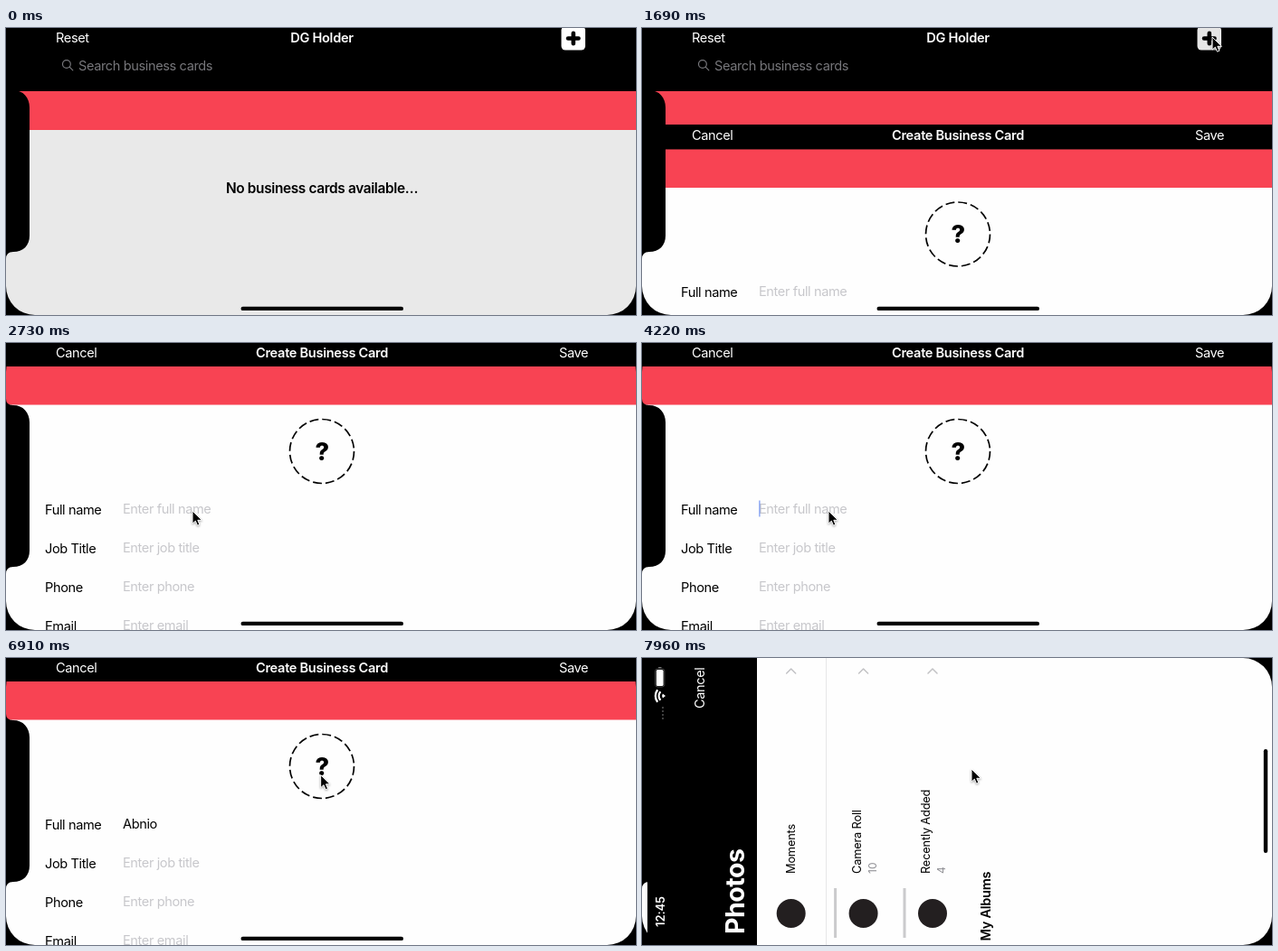
These frames come from a looping animation (696x318 px, 8000 ms). An HTML page:

```html
<!DOCTYPE html>
<html lang="en">
<head>
<meta charset="utf-8">
<title>Card holder</title>
<style>
  html, body { margin: 0; width: 100%; height: 100%; overflow: hidden; background: #000; }
  svg { display: block; width: 696px; height: 318px; }
  text { font: 400 14.6px Inter, Roboto, sans-serif; letter-spacing: -.4px; white-space: pre; }
  .semi { font-weight: 600; letter-spacing: -.3px; }
  .notice { font-size: 15.4px; font-weight: 600; letter-spacing: -.36px; }
  .large { font-size: 28.6px; font-weight: 700; letter-spacing: -.5px; }
  .hint { fill: #c7c7cb; }
  .row { font-size: 12.8px; letter-spacing: -.18px; }
  .count { font-size: 12px; letter-spacing: 0; fill: #8e8e93; }
  .clock { font-size: 13px; font-weight: 600; letter-spacing: -.1px; }
  .white { fill: #fff; }
  .banner { fill: #f84353; }
  .line { fill: none; stroke-linecap: round; stroke-linejoin: round; }
  .flat { fill: none; stroke-linecap: butt; }
</style>
</head>
<body>
<svg viewBox="0 0 696 318">
  <g id="home">
    <rect width="696" height="70"/>
    <rect class="banner" y="70" width="696" height="43"/>
    <rect y="113" width="696" height="205" fill="#e9e9e9"/>
    <text class="white" x="55" y="16">Reset</text>
    <text class="white semi" x="349" y="16" text-anchor="middle">DG Holder</text>
    <g id="add">
      <rect x="613.5" y="-2" width="26.5" height="26.5" rx="4.5" fill="#fff"/>
      <path class="line" stroke="#000" stroke-width="4.6" d="M621 11.5h11.5M626.8 5.7v11.6"/>
    </g>
    <path class="line" stroke="#77777b" stroke-width="1.2" d="M62.5 40a4.4 4.4 0 1 0 8.8 0a4.4 4.4 0 1 0-8.8 0M70.2 43.2l3.6 3.6"/>
    <text x="80" y="46.5" fill="#77777b">Search business cards</text>
    <text class="notice" x="349" y="183" text-anchor="middle">No business cards available…</text>
  </g>

  <g id="sheet">
    <g id="compactBar">
      <rect y="-1.5" width="696" height="28"/>
      <text class="white" x="55" y="16">Cancel</text>
      <text class="white semi" x="349" y="16" text-anchor="middle">Create Business Card</text>
      <text class="white" x="611" y="16">Save</text>
    </g>
    <g id="largeBar">
      <rect width="696" height="120"/>
      <text class="white" x="17" y="60">Cancel</text>
      <text class="white large" x="309" y="104.5" text-anchor="end">Create Business Card</text>
    </g>
    <g id="form">
      <rect class="banner" y="26" width="696" height="43"/>
      <rect y="68.5" width="696" height="330" fill="#fefefe"/>
      <g id="avatar">
        <circle class="flat" cx="349" cy="120" r="35.5" stroke="#000" stroke-width="1.7" stroke-dasharray="9.9 4.04"/>
        <text x="349" y="129.5" text-anchor="middle" style="font-size:27px;font-weight:800">?</text>
      </g>
      <g id="fields"></g>
      <text id="typed" x="129" y="189"></text>
      <rect id="caret" y="174.5" width="1.7" height="18" fill="#3c6df0"/>
    </g>
  </g>

  <g id="picker">
    <rect x="127" width="700" height="318" fill="#fefefe"/>
    <rect x="6" width="121" height="318"/>
    <path d="M203.5 0V318" stroke="#e6e6e8"/>
    <g id="albums"></g>
  </g>

  <path d="M0 62Q0 69 8 69C19 69 26 77 26 88V230C26 241 19 248 8 248Q0 248 0 256Z"/>
  <g id="corners"></g>
  <rect id="homeBar" x="259.5" y="308.7" width="179.5" height="4.4" rx="2.2"/>
  <rect id="sideBar" x="686.8" y="101" width="4.4" height="115" rx="2.2"/>

  <g id="status">
    <rect x="14.6" y="12" width="10.2" height="20" rx="2.6" fill="none" stroke="#555" stroke-width=".8"/>
    <rect class="white" x="15.8" y="13" width="7.8" height="18" rx="1.6"/>
    <rect x="18" y="10" width="3.6" height="1.3" rx=".6" fill="#777"/>
    <path class="flat" stroke="#fff" stroke-width="2.3" d="M17.2 35.2A11 11 0 0 0 17.2 48.8M20.4 37.3A7.3 7.3 0 0 0 20.4 46.7"/>
    <path class="white" d="M26 42L22.9 39.4Q21.2 42 22.9 44.6Z"/>
    <path class="line" stroke="#555" stroke-width="2" stroke-dasharray="0 4" d="M23 55V68"/>
    <g id="clock"></g>
  </g>

  <path id="cursor" d="M0 0V14.2L3.3 11.2L5.5 16.2L7.9 15.2L5.8 10.3H10.4Z" stroke="#fff" stroke-linejoin="round" style="filter:drop-shadow(0 1px 1px rgba(0,0,0,.35))"/>
</svg>
<script>
const $ = id => document.getElementById(id);
const move = (id, x, y) => $(id).setAttribute('transform', `translate(${x} ${y})`);
const show = (id, on) => { $(id).style.display = on ? '' : 'none'; };
const sideText = (x, y, cls, label) =>
  `<text class="${cls}" transform="translate(${x} ${y}) rotate(-90)">${label}</text>`;

$('fields').innerHTML = ['Full name', 'Job Title', 'Phone', 'Email'].map((label, i) => `
  <text x="43" y="${190 + 43 * i}">${label}</text>
  <text class="hint" ${i ? '' : 'id="nameHint"'} x="129" y="${189 + 43 * i}">Enter ${label.toLowerCase()}</text>`).join('');

const album = (x, label, count) => `
  <path class="line" stroke="#c2c2c5" stroke-width="1.5" d="M${x - 5} 17l5-5l5 5"/>
  <circle cx="${x}" cy="283" r="16" fill="#231f20"/>
  ${sideText(count ? x - 3 : x + 4, 239, 'row', label)}
  ${count ? sideText(x + 14, 239, 'count', count) +
    `<rect x="${x - 32.5}" y="255" width="3" height="55" fill="#cbcbcd"/>` : ''}`;

$('albums').innerHTML =
  sideText(68.7, 56, 'white', 'Cancel') +
  sideText(113.5, 306, 'white large', 'Photos') +
  sideText(385.5, 313.5, 'semi', 'My Albums') +
  album(164.7, 'Moments') + album(244.6, 'Camera Roll', 10) + album(321, 'Recently Added', 4);
$('clock').innerHTML = sideText(24.6, 298, 'white clock', '12:45');

for (const [x, sx] of [[0, 1], [696, -1]])
  for (const [y, sy] of [[0, 1], [318, -1]])
    $('corners').innerHTML +=
      `<path d="M0 0H32A32 32 0 0 0 0 32Z" transform="translate(${x} ${y}) scale(${sx} ${sy})"/>`;

// The picture advances in even beats after a short lead-in.
const LOOP = 8000, LEAD = 490, BEAT = 149.2;
const PRESS_ADD = 7, FOCUS = 21, BLUR = 42, PRESS_AVATAR = 47;
const NAME = 'Abnio', KEYS = [32, 33, 35, 36, 37];
const POINTER_START = [676, 82];
const LEGS = [
  { from: 0, to: 4, x: 630, y: 10 },
  { from: 10, to: 15, x: 206, y: 186 },
  { from: 40, to: 44, x: 364, y: 123 }
];

// Critically damped slide from 1 to 0.
const slide = (beat, start) => {
  const s = Math.max(0, beat - start) * 2.82;
  return (1 + s) * Math.exp(-s);
};

const ease = u => {
  u = Math.min(1, Math.max(0, u));
  return u * u * u * (u * (6 * u - 15) + 10);
};

const pointerAt = beat => LEGS.reduce(([px, py], { from, to, x, y }) => {
  const e = ease((beat - from) / (to - from));
  return [px + (x - px) * e, py + (y - py) * e];
}, POINTER_START);

// Solid for four beats, then fades out and back over the next four.
function caretLevel(beat, lastKey) {
  if (beat < FOCUS || beat >= BLUR) return 0;
  const phase = (beat - lastKey) % 8;
  return phase < 4 ? 1 : phase === 4 || phase === 7 ? .5 : 0;
}

function draw(now) {
  const beat = Math.floor((now % LOOP - LEAD) / BEAT);
  const portrait = beat > PRESS_AVATAR;

  $('add').style.opacity = beat >= PRESS_ADD ? .9 : 1;
  $('avatar').style.opacity = beat === PRESS_AVATAR ? .8 : 1;
  show('sheet', beat > PRESS_ADD);
  move('sheet', 0, 318 * slide(beat, 7.2));
  show('compactBar', !portrait);
  show('largeBar', portrait);
  move('form', 0, portrait ? 92.5 : 0);

  const pressed = KEYS.filter(key => key <= beat);
  $('typed').textContent = NAME.slice(0, pressed.length);
  show('nameHint', !pressed.length);
  $('caret').setAttribute('x', 129 + (pressed.length ? $('typed').getComputedTextLength() : 0));
  $('caret').style.opacity = caretLevel(beat, pressed.pop() || FOCUS);

  show('picker', portrait);
  move('picker', 696 * slide(beat, 47.585) - 6, 0);
  show('status', portrait);
  show('homeBar', !portrait);
  show('sideBar', portrait);
  $('sideBar').style.opacity = ((beat - PRESS_AVATAR) / 3) ** 2;

  show('cursor', beat >= 0);
  move('cursor', ...pointerAt(beat));
}

function loop() {
  draw(performance.now());
  requestAnimationFrame(loop);
}
loop();
</script>
</body>
</html>
```
